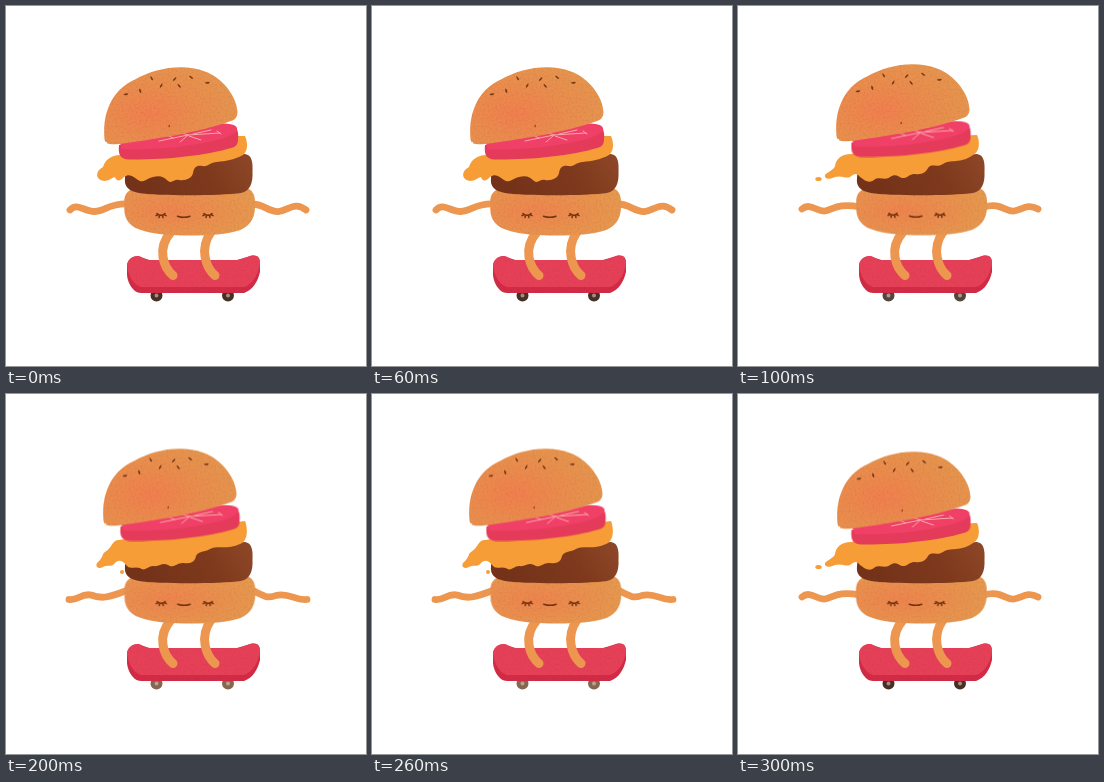
Write an HTML page that moves like this. It is 360 px wide and 360 px high and loops after 0.4 s.

```html
<!DOCTYPE html>
<html lang="en">
<head>
<meta charset="utf-8">
<title>Skating burger</title>
<style>
html, body { margin: 0; height: 100%; overflow: hidden; background: #fff; }
svg { display: block; width: 100vw; height: 100vh; }
.limb { fill: none; stroke: #ec964f; stroke-linecap: round; }
.ink { fill: none; stroke: #74330f; stroke-width: 1.5; stroke-linecap: round; }

/* Every pose holds for 100 ms. */
#lid, #tomato, #cheese, #armL, #armR, #base, .wheel, .drop {
  animation: 400ms step-end infinite;
}
#lid { animation-name: lid; }
#tomato { animation-name: tomato; }
#cheese { animation-name: cheese; }
#armL { animation-name: armL; }
#armR { animation-name: armR; }
#base { animation-name: base; }
.wheel { animation-name: wheel; }
#splash { animation-name: splash; }
#drip { animation-name: drip; }

@keyframes lid {
  0% { transform: none; }
  25% { transform: translate(0, -3px); }
  50% { transform: translate(-1px, -6.5px); }
  75% { transform: translate(1px, -3.5px); }
}
@keyframes tomato {
  0% { transform: none; }
  25% { transform: translate(.5px, -2.5px); }
  50% { transform: translate(1.5px, -6.5px); }
  75% { transform: translate(.5px, -3px); }
}
@keyframes cheese {
  0% { d: path("M113 149C103 150 99 155 97 161C89 165 89 174 98 175C103 175 105 172 109 171C110 175 114 176 118 171C124 167 127 171 132 174C137 178 141 172 147 171C154 169 158 171 162 175C166 178 168 173 173 174C180 175 186 172 187 167C188 161 191 159 196 160C203 161 204 156 211 156C219 155 228 154 237 149C242 145 242 137 239 130L215 130Z"); }
  25%, 75% { d: path("M113 148C103 148 98 153 97 160C96 164 89 166 87 169C86 173 91 174 97 171C104 169 107 173 112 171C117 167 119 167 122 171C126 174 131 178 136 174C141 170 148 175 152 171C158 167 160 171 164 172C169 173 172 167 177 168C184 169 188 166 190 162C193 157 199 162 205 158C212 153 223 158 235 149C242 146 242 135 239 129L215 130Z"); }
  50% { d: path("M113 146C106 146 106 154 99 158C96 160 97 164 92 168C88 172 92 176 97 173C103 170 105 174 109 169C113 165 117 167 120 171C124 176 128 172 134 174C139 178 142 172 147 172C154 173 156 168 162 171C168 175 171 168 178 169C186 170 189 167 190 162C192 157 199 158 204 155C211 151 222 156 234 150C242 147 242 135 239 127L215 130Z"); }
}
@keyframes armL {
  0% { d: path("M64 204C71 196 79 206 89 205.500C99 205 104 197 122 198"); }
  25%, 75% { d: path("M64 203C72 196 79 206 87 205C96 203 100 197 122 201"); }
  50% { d: path("M63 205.500C72 207 75 199 85 201C95 205 102 204 122 196"); }
}
@keyframes armR {
  0% { d: path("M246 198C258 198 263 206.500 273 205.500C283 204 289 195 300 204"); }
  25%, 75% { d: path("M246 201C262 196 268 206 276 205C284 204 289 197 300 203"); }
  50% { d: path("M246 196C257 202 262 205 270 201.500C283 198 289 207 301 205.500"); }
}
@keyframes base {
  0% { transform: none; }
  25% { transform: translate(0, -.3px); }
  50% { transform: translate(.2px, 0); }
  75% { transform: translate(-.3px, 0); }
}
@keyframes wheel {
  0%, 75% { stroke: #493025; fill: #a38f82; }
  25% { stroke: #55443c; fill: #a99a90; }
  50% { stroke: #876650; fill: #b9a28f; }
}
@keyframes splash { 0%, 50% { visibility: hidden; } 25%, 75% { visibility: visible; } }
@keyframes drip { 0%, 75% { visibility: hidden; } 50% { visibility: visible; } 25% { visibility: hidden; } }
</style>
</head>
<body>
<svg viewBox="0 0 360 360">
  <defs>
    <radialGradient id="bread" cx=".34" cy=".6" r=".72">
      <stop stop-color="#f1804f"/><stop offset=".5" stop-color="#ea8d4e"/><stop offset="1" stop-color="#e5964f"/>
    </radialGradient>
    <radialGradient id="breadLow" cx=".34" cy=".5" r=".7">
      <stop stop-color="#ee854f"/><stop offset="1" stop-color="#e6994f"/>
    </radialGradient>
    <linearGradient id="meat" x2="1" y2="-.2">
      <stop stop-color="#74331a"/><stop offset=".55" stop-color="#7f3a1d"/><stop offset="1" stop-color="#914b2b"/>
    </linearGradient>
    <!-- Slightly ragged, grainy crayon surface -->
    <filter id="crayon" x="-5%" y="-8%" width="110%" height="116%" color-interpolation-filters="sRGB">
      <feTurbulence type="fractalNoise" baseFrequency=".5" numOctaves="2" seed="4" result="noise"/>
      <feDisplacementMap in="SourceGraphic" in2="noise" scale="1.5" xChannelSelector="R" yChannelSelector="G" result="rough"/>
      <feColorMatrix in="noise" values="0 0 0 0 .45  0 0 0 0 .15  0 0 0 0 .05  .25 0 0 0 -.11" result="specks"/>
      <feComposite in="specks" in2="rough" operator="in" result="grain"/>
      <feMerge><feMergeNode in="rough"/><feMergeNode in="grain"/></feMerge>
    </filter>
    <path id="seed" d="M-2 -.8Q0 -1.400 2 .2Q1 1.500-2 -.8Z" fill="#713411" stroke="#713411" stroke-width=".6"/>
    <path id="eye" class="ink" d="M-4 -1Q0 2.500 4 -1M-3 0L-5 1.200M-1.400 .8L-2 3M1.400 .8L2 3M3 0L5 1.200"/>
  </defs>

  <g stroke-width="4">
    <circle class="wheel" cx="150.500" cy="289.500" r="4"/>
    <circle class="wheel" cx="222" cy="289.500" r="4"/>
  </g>
  <g filter="url(#crayon)">
    <path fill="#d32b47" d="M121 261C121 254 126 250 132 250L143 254H231L246 249.500C252 249 254 252 254 258V266C252 275 247 284 238 287H135C127 287 121 276 121 268Z"/>
    <path fill="#e64059" d="M121 260C121 254 126 250 132 250C136 250.500 138 254 144 254H231C237 254 241 250 247 249.500C252 249 254.500 252 254 258C253 267 246 279 238 281H135C127 279 122 268 121 260Z"/>
  </g>
  <g class="limb" stroke-width="9">
    <path d="M165 226C150 243 158 262 167 269.500"/>
    <path d="M205 226C193 243 200 262 209 269.500"/>
  </g>

  <g class="limb" stroke-width="6.800">
    <path id="armL" d="M64 204C71 196 79 206 89 205.500C99 205 104 197 122 198"/>
    <path id="armR" d="M246 198C258 198 263 206.500 273 205.500C283 204 289 195 300 204"/>
  </g>

  <g id="base">
    <path filter="url(#crayon)" fill="url(#breadLow)" d="M128 183C145 181 225 181 240 182C248 184 249.500 191 249 201C249 214 242 222 231 225C213 231 156 231 138 225C124 222 117 213 118.500 200C117 190 121 184 128 183Z"/>
    <use href="#eye" x="155" y="208.500"/>
    <use href="#eye" x="202" y="208.500"/>
    <path class="ink" d="M171.500 210.200Q178 212.500 184 210.200"/>
  </g>

  <path filter="url(#crayon)" fill="url(#meat)" d="M128 160C150 151 220 149 239 148C246 149 247 156 246.500 166C247 177 244 185 235 187C214 190 151 190 133 187C122 185 118 180 119 172C119 166 122 162 128 160Z"/>

  <g fill="#f69d37">
    <path id="cheese" d="M113 149C103 150 99 155 97 161C89 165 89 174 98 175C103 175 105 172 109 171C110 175 114 176 118 171C124 167 127 171 132 174C137 178 141 172 147 171C154 169 158 171 162 175C166 178 168 173 173 174C180 175 186 172 187 167C188 161 191 159 196 160C203 161 204 156 211 156C219 155 228 154 237 149C242 145 242 137 239 130L215 130Z"/>
    <ellipse id="splash" class="drop" cx="80.500" cy="173" rx="3.200" ry="2"/>
    <circle id="drip" class="drop" cx="116" cy="178" r="2"/>
  </g>

  <g id="tomato">
    <path fill="#e53b5a" d="M113 139L225 119C231 119 233 126 232 134C232 138 230 141 225 142C199 150 156 154 122 153.500C114 153 112 148 113 139Z"/>
    <path fill="#f04068" d="M113 134L205 118C217 117 229 117 231 122C233 130 205 136 185 139C160 143 133 144 116 143Z"/>
    <path fill="none" stroke="#f7a9a6" stroke-width="1" stroke-linecap="round" d="M182 129L153 135M182 129L171 125M182 129L214 127M183 130L195 134M181 130L174 136M187 128L205 124M211 125L215 128M161 129L167 132"/>
  </g>

  <g id="lid">
    <path filter="url(#crayon)" fill="url(#bread)" d="M98.500 133C96 106 107 83 129 73.500C149 62 177 57 199 65.500C217 72 231 91 231.500 106C231.500 111 229 114 225 115C195 126 145 134 113 138C104 139 99 138 98.500 133Z"/>
    <use href="#seed" transform="translate(145.500 72.500) rotate(45)"/>
    <use href="#seed" transform="translate(155 79.500) rotate(100)"/>
    <use href="#seed" transform="translate(168.500 73) rotate(115)"/>
    <use href="#seed" transform="translate(173 80) rotate(35)"/>
    <use href="#seed" transform="translate(185 71.500) rotate(20)"/>
    <use href="#seed" transform="translate(201.500 77) rotate(-20)"/>
    <use href="#seed" transform="translate(134 85) rotate(60)"/>
    <use href="#seed" transform="translate(120 88.500) rotate(-25)"/>
    <use href="#seed" transform="translate(163 120) rotate(80) scale(.6)"/>
  </g>
</svg>
</body>
</html>
```
